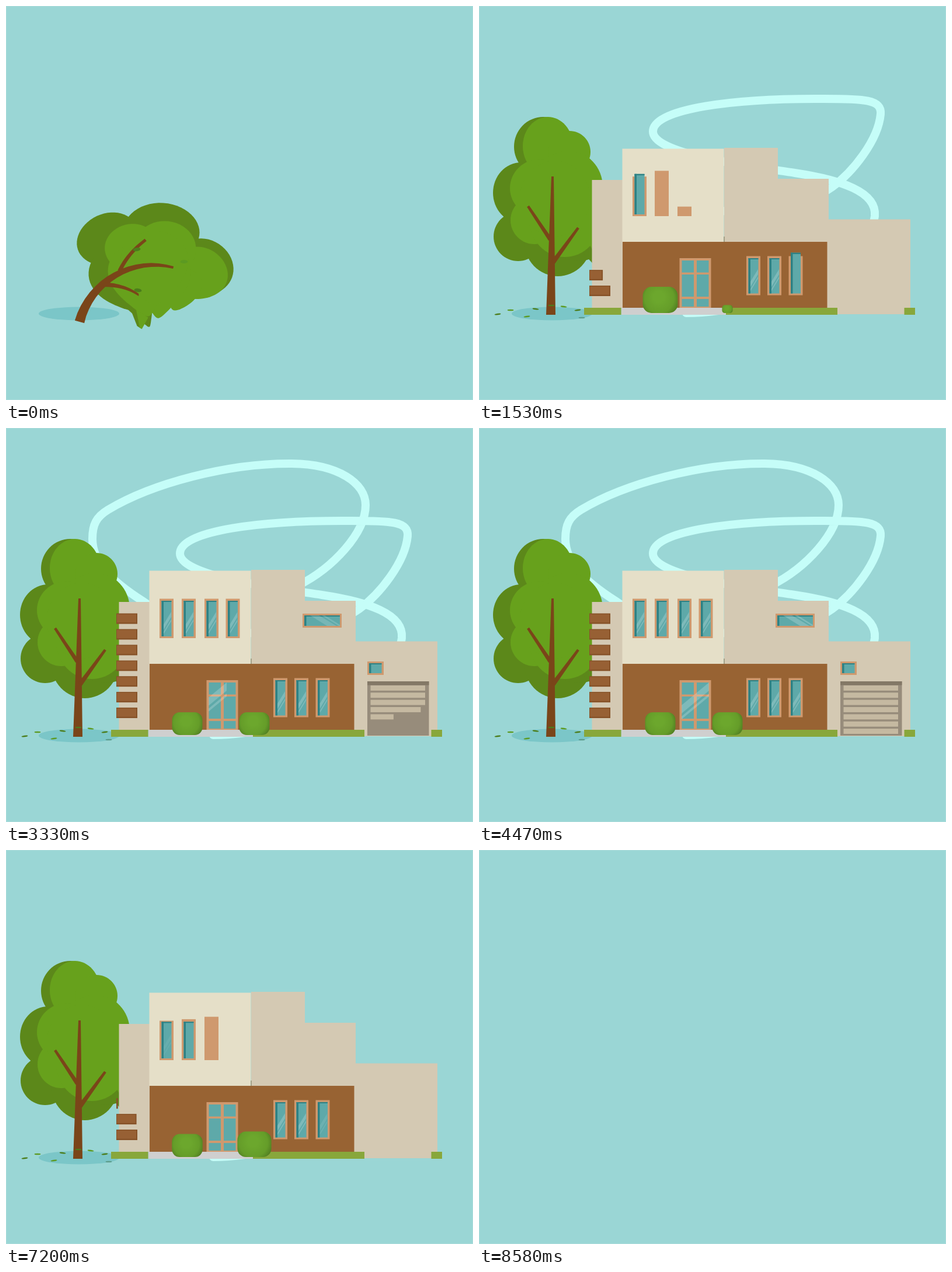
An HTML page with a canvas that plays this animation: 800x675 px, repeating every 9.78 s.

```html
<!DOCTYPE html>
<html lang="en">
<head>
<meta charset="utf-8">
<title>House</title>
<style>
html, body { margin: 0; width: 100%; height: 100%; overflow: hidden; background: #9ad6d5; }
canvas { display: block; }
</style>
</head>
<body>
<canvas id="stage" width="800" height="675"></canvas>
<script>
const ctx = document.getElementById('stage').getContext('2d');
const LOOP = 9780, OUT = 4860, MIRROR = 8870, END = 8580;
const TAN = '#cf996e', TEAL = '#5ea9a9', DEEP = '#2d8184', BEIGE = '#d4c9b3';

const clamp = v => Math.max(0, Math.min(1, v));
const mix = (a, b, p) => a + (b - a) * p;
const cubic = p => 1 - (1 - clamp(p)) ** 3;
const back = p => { const q = clamp(p) - 1; return 1 + 3.2 * q ** 3 + 2.2 * q * q; };
const grow = (u, start, dur = 400) => u <= start ? 0 : back((u - start) / dur);

function keys(t, list) {
  if (t <= list[0][0]) return list[0][1];
  for (let i = 1; i < list.length; i++) {
    const [t0, a] = list[i - 1], [t1, b] = list[i];
    if (t < t1) return mix(a, b, (t - t0) / (t1 - t0));
  }
  return list[list.length - 1][1];
}

function rect(color, x, y, w, h) {
  ctx.fillStyle = color;
  ctx.fillRect(x, y, w, h);
}

function poly(color, pts) {
  ctx.fillStyle = color;
  ctx.beginPath();
  pts.forEach(([x, y]) => ctx.lineTo(x, y));
  ctx.closePath();
  ctx.fill();
}

function ellipse(color, x, y, rx, ry, rot = 0) {
  if (rx <= 0 || ry <= 0) return;
  ctx.fillStyle = color;
  ctx.beginPath();
  ctx.ellipse(x, y, rx, ry, rot, 0, 7);
  ctx.fill();
}

// Scales a drawing around a fixed point
function scaled(x, y, sx, sy, draw) {
  if (!sx || !sy) return;
  ctx.save();
  ctx.translate(x, y);
  ctx.scale(sx, sy);
  ctx.translate(-x, -y);
  draw();
  ctx.restore();
}

function clipped(x, y, w, h, draw) {
  ctx.save();
  ctx.beginPath();
  ctx.rect(x, y, w, h);
  ctx.clip();
  draw();
  ctx.restore();
}

// ---- ribbon ----
const ROUTE = 'M355 526C500 525 668 440 678 360C682 318 620 298 541 286' +
  'C470 275 298 255 298 215C298 175 440 158 590 159C660 159 690 160 688 185' +
  'C684 230 640 285 605 310C520 370 330 365 235 297C180 262 148 230 148 190' +
  'C148 165 155 152 175 140C250 95 380 60 490 61C570 62 616 95 616 132' +
  'C616 180 560 240 500 270';
const ribbon = new Path2D(ROUTE);
const ruler = document.createElementNS('http://www.w3.org/2000/svg', 'path');
ruler.setAttribute('d', ROUTE);
const FULL = ruler.getTotalLength();

function lengthNear(x, y) {
  let best = 0, min = 1e9;
  for (let s = 0; s < FULL; s += 2) {
    const p = ruler.getPointAtLength(s), d = Math.hypot(p.x - x, p.y - y);
    if (d < min) { min = d; best = s; }
  }
  return best;
}
const drawIn = [[480, 0], [840, lengthNear(541, 286)], [2250, FULL]];
const drawOut = [[OUT, FULL], [6270, lengthNear(687, 178)], [7400, 0]];

function drawRibbon(t) {
  const len = keys(t, t < OUT ? drawIn : drawOut);
  if (len <= 0) return;
  ctx.save();
  ctx.strokeStyle = '#c5fdf8';
  ctx.lineWidth = 14;
  ctx.lineCap = 'round';
  ctx.lineJoin = 'round';
  if (len < FULL) ctx.setLineDash([len, FULL * 2]);
  ctx.stroke(ribbon);
  ctx.restore();
}

// ---- tree ----
const BASE = [123, 528];
const darkBlobs = [[110, 241, 50, 51], [72, 320, 48, 52], [67, 395, 42, 42],
  [135, 402, 58, 61], [170, 385, 55, 52]];
const lightBlobs = [[118, 240, 43, 50], [155, 250, 36, 36], [153, 310, 59, 62],
  [105, 312, 52, 50], [95, 367, 41, 41], [147, 366, 61, 64], [130, 330, 60, 65]];
const leaves = [[32, 528, 224, 417], [54, 521, 305, 438], [97, 519, 226, 487],
  [82, 532, 232, 450], [124, 513, 290, 470], [145, 515, 260, 430],
  [169, 521, 250, 470], [176, 534, 300, 490]];

// Bends the tree along an arc that starts at its foot
function warp(x, y, bend, tall, wide) {
  const h = BASE[1] - y, dx = (x - BASE[0]) * wide;
  const a = bend * 0.26, k = bend * 0.0066, hh = Math.max(0, h);
  const end = a + k * hh;
  let sx, sy;
  if (Math.abs(k) < 1e-7) { sx = 0; sy = hh; }
  else {
    sx = (Math.cos(a) - Math.cos(end)) / k;
    sy = (Math.sin(end) - Math.sin(a)) / k;
  }
  sy += h - hh;
  const off = Math.max(0, bend);
  return [BASE[0] + 3 * off + tall * sx + dx * Math.cos(end),
    BASE[1] + 12 * off - tall * sy + dx * Math.sin(end)];
}

function drawTree(t) {
  let bend, tall, wide, land = 1, shade = 1;
  if (t < OUT) {
    bend = 1 - back(t / 750);
    tall = mix(0.88, 1, cubic(t / 600));
    wide = mix(1.05, 1, cubic(t / 600));
    land = cubic(t / 780);
  } else {
    tall = wide = keys(t, [[7800, 1], [7980, 1.067], [8200, 1.2], [8540, 0]]);
    bend = keys(t, [[8200, 0], [8500, 1]]);
    shade = keys(t, [[8300, 1], [8560, 0]]);
  }
  ellipse('#7bc6c8', 125, 527, 69 * shade, 11.5 * shade);
  if (tall <= 0) return;

  const bent = (color, pts) => poly(color, pts.map(([x, y]) => warp(x, y, bend, tall, wide)));
  const blob = color => ([x, y, rx, ry]) => bent(color, Array.from({ length: 64 }, (_, i) => {
    const a = i * Math.PI / 32;
    return [x + rx * Math.cos(a), y + ry * Math.sin(a)];
  }));
  const limb = (x0, y0, w0, x1, y1, w1) => {
    const len = Math.hypot(x1 - x0, y1 - y0);
    const nx = (y0 - y1) / len / 2, ny = (x1 - x0) / len / 2;
    const left = [], right = [];
    for (let i = 0; i <= 16; i++) {
      const p = i / 16, x = mix(x0, x1, p), y = mix(y0, y1, p), w = mix(w0, w1, p);
      left.push([x + nx * w, y + ny * w]);
      right.unshift([x - nx * w, y - ny * w]);
    }
    bent('#7a4519', left.concat(right));
  };

  darkBlobs.forEach(blob('#5c881a'));
  bent('#5c881a', [[180, 425], [212, 460], [218, 456], [205, 385]]);
  lightBlobs.forEach(blob('#67a11c'));
  bent('#67a11c', [[190, 410], [217, 457], [221, 453], [210, 370]]);
  limb(123, 529, 16, 126, 292, 4);
  limb(122, 400, 7, 84, 343, 4.5);
  limb(127, 439, 8, 170, 380, 4.5);

  const k = t < OUT ? 1 : tall;
  leaves.forEach(([x, y, fx, fy], i) => {
    const gx = BASE[0] + (x - BASE[0]) * k, gy = BASE[1] + (y - BASE[1]) * k;
    const color = i === 7 ? '#5d9d8c' : i % 2 ? '#5c9a22' : '#4c7d1b';
    const grown = i < 3 ? 1 : clamp(t / 200);
    ellipse(color, mix(fx, gx, land), mix(fy, gy, land),
      mix(6.5, 5.5, land) * k * grown, mix(3, 1.3, land) * k * grown, (i % 3 - 1) * 0.15);
  });
}

// ---- house ----
function glass(x, y, w, h) {
  rect(TEAL, x, y, w, h);
  rect(DEEP, x, y, 3.5, h);
  rect(DEEP, x, y, w, 2);
}

function shine(x, y, w, h, p) {
  if (p <= 0) return;
  clipped(x, y, w, h, () => {
    ctx.globalAlpha = 0.2 * p;
    const m = y + h * 0.42, s = w * 1.5;
    poly('#fff', [[x, m + s * 0.75], [x + w, m - s * 0.35], [x + w, m + s * 0.1], [x, m + s * 1.2]]);
    poly('#fff', [[x, m + s * 1.4], [x + w, m + s * 0.3], [x + w, m + s * 0.48], [x, m + s * 1.58]]);
  });
}

function tallWindow(u, x, y, h, start) {
  const foot = y + h;
  scaled(x, foot, 1, grow(u, start), () => rect(TAN, x, y, 24, h));
  scaled(x, foot - 3, 1, grow(u, start + 230, 330), () => glass(x + 3.5, y + 3.5, 17, h - 6.5));
  shine(x + 7, y + 4, 13, h - 7, clamp((u - start - 480) / 150));
}

function wideWindow(u) {
  scaled(508, 330, grow(u, 2392), 1, () => rect(TAN, 508, 318, 67, 24));
  scaled(511, 330, grow(u, 2592), 1, () => glass(511, 321, 61, 18));
  const p = clamp((u - 3100) / 300);
  if (!p) return;
  clipped(511, 321, 61, 18, () => {
    ctx.globalAlpha = 0.2 * p;
    poly('#fff', [[521, 321], [536, 321], [566, 339], [550, 339]]);
    poly('#fff', [[541, 321], [546, 321], [575, 339], [570, 339]]);
  });
}

function door(u) {
  scaled(370, 517, 1, grow(u, 794), () => rect(TAN, 343.5, 432, 54, 85));
  scaled(370, 515, 1, grow(u, 1060), () => {
    for (const x of [347.5, 373]) {
      rect(TEAL, x, 436, 20.5, 20.5);
      rect(TEAL, x, 460, 20.5, 38);
      rect(TEAL, x, 502, 20.5, 13);
    }
  });
  const p = cubic((u - 3000) / 850);
  if (!p) return;
  clipped(347, 436, 47, 79, () => {
    const x = mix(-70, 0, p);
    ctx.globalAlpha = 0.2;
    poly('#fff', [[347 + x, 475], [394 + x, 436], [394 + x, 450], [347 + x, 489]]);
    poly('#fff', [[347 + x, 494], [394 + x, 455], [394 + x, 460], [347 + x, 499]]);
  });
}

function bush(u, x, start) {
  const p = grow(u, start);
  scaled(x + 26, 526, p, p, () => {
    const g = ctx.createRadialGradient(x + 24, 502, 8, x + 25, 505, 31);
    g.addColorStop(0, '#6ca72d');
    g.addColorStop(0.6, '#659d29');
    g.addColorStop(1, '#4d7820');
    ctx.fillStyle = g;
    ctx.beginPath();
    ctx.roundRect(x, 487, 52, 39, 13);
    ctx.fill();
  });
}

function garage(u) {
  scaled(672, 434, 1, grow(u, 2440), () => rect('#978c7b', 619, 434, 105.5, 93));
  if (u > 2440) rect('#837866', 619, 434, 105.5, 6.5 * clamp((u - 2440) / 60));
  for (let i = 0; i < 7; i++) {
    const p = cubic((u - 2800 - i * 120) / 300);
    rect('#c5b9a1', 624.5, 441 + i * 12.35, 93.5 * p, 8.9);
  }
  const w = grow(u, 2720), g = grow(u, 2950);
  scaled(633, 412, w, w, () => rect(TAN, 619, 400, 28, 23));
  scaled(633, 412, g, g, () => glass(622, 403, 21.5, 17));
}

function drawHouse(u) {
  const wall = (color, x, y, w, foot, p) => {
    if (p > 0) rect(color, x, foot - (foot - y) * p, w, (foot - y) * p);
  };
  wall(BEIGE, 193.5, 298, 53, 517,
    keys(u, [[360, 0], [700, 1.1], [840, 1.073], [890, 1.023], [1000, 1]]));
  wall(BEIGE, 420, 243, 92, 528,
    keys(u, [[430, 0], [760, 0.97], [840, 0.94], [890, 0.916], [1050, 1]]));
  wall(BEIGE, 511, 296, 88, 528,
    keys(u, [[380, 0], [760, 0.97], [840, 0.952], [890, 0.93], [1040, 1]]));
  wall(BEIGE, 598, 365.5, 141, 528, grow(u, 300));
  wall('#986333', 246, 404, 350.5, 517, grow(u, 350));
  wall('#e5dfc8', 245.5, 244.5, 174, 404,
    keys(u, [[400, 0], [780, 0.9], [840, 0.917], [890, 0.942], [1050, 1]]));
  if (u > 800) rect('#7b7555', 419.5, 395, 1, 9);

  const ground = cubic((u - 300) / 300);
  if (ground > 0) {
    rect('#cfcfcf', 244, 517, 179 * ground, 12);
    rect('#88a73b', 180, 517, 63.5 * ground, 12);
    rect('#88a73b', 423, 517, 191 * ground, 12);
    rect('#88a73b', 728.5, 517, 18.5 * ground, 12);
  }

  for (let i = 0; i < 7; i++) {
    const w = 36 * cubic((u - 1180 - i * 240) / 380), y = 479 - i * 26.9;
    if (!w) continue;
    rect('#875329', 189, y, w, 18);
    rect('#976034', 190, y + 1.5, Math.max(0, w - 3), 14);
  }

  door(u);
  [458, 494, 530.5].forEach((x, i) => tallWindow(u, x, 428.5, 67, 650 + i * 235));
  [263, 301, 340, 376.5].forEach((x, i) => tallWindow(u, x, 292.5, 67.5, 1150 + i * 180));
  wideWindow(u);
  garage(u);
  bush(u, 284.5, 1300);
  bush(u, 399.5, 1500);
}

function draw(t) {
  rect('#9ad6d5', 0, 0, 800, 675);
  ctx.strokeStyle = '#a9dcdb';
  ctx.lineWidth = 1;
  ctx.strokeRect(0.5, 0.5, 799, 674);
  if (t >= END) return;
  drawRibbon(t);
  drawTree(t);
  drawHouse(t < OUT ? t : MIRROR - t);
}

const begin = performance.now();
function tick() {
  const t = (performance.now() - begin) % LOOP;
  draw(Math.floor(t / 30) * 30);
  requestAnimationFrame(tick);
}
tick();
</script>
</body>
</html>
```
